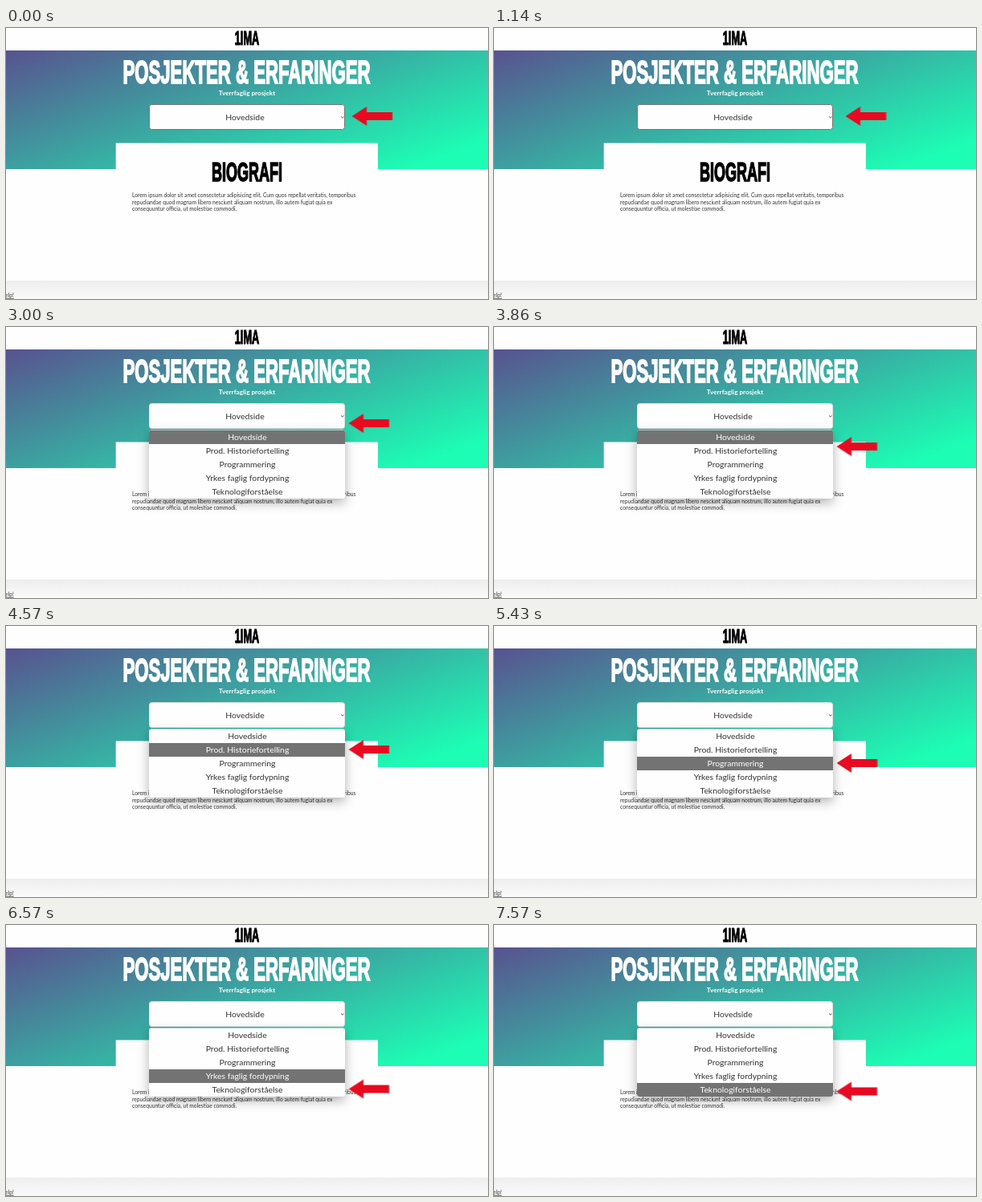
An HTML page that plays this animation: 600x338 px, repeating every 7710 ms.

```html
<!DOCTYPE html>
<html lang="no">
<head>
<meta charset="utf-8">
<title>Posjekter &amp; erfaringer</title>
<style>
  html, body { margin: 0; width: 100%; height: 100%; overflow: hidden; background: #fefefe; }
  svg { display: block; width: 600px; height: 338px; }
  text { font: 10.4px Lato, "Open Sans", sans-serif; fill: #333; }
  .mid { text-anchor: middle; }
  /* one narrow, heavy display face for all headings */
  .head {
    font: 700 40px "Liberation Sans", Arial, sans-serif;
    fill: #000; stroke: #000; stroke-width: .05em;
    transform: scaleX(.555); transform-box: fill-box; transform-origin: center;
  }
  .light { fill: #fff; stroke: #fff; }
  .copy { font-size: 6.72px; }
  .menu { animation: open 7.71s step-end infinite; }
  .ring { animation: ring 7.71s step-end infinite; }
  .pick { animation: pick 7.71s step-end infinite; }
  .arrow { animation: point 7.71s ease-in-out infinite; }
  .panel { filter: drop-shadow(0 5px 7px rgba(0, 0, 0, .3)); }
  @keyframes open { 0% { visibility: hidden } 35.2%, 100% { visibility: visible } }
  @keyframes ring { 0% { stroke: #777 } 35.2%, 100% { stroke: #e4e4e4 } }
  @keyframes pick {
    0% { transform: translateY(0) }
    51% { transform: translateY(17px) }
    63% { transform: translateY(34px) }
    74% { transform: translateY(51px) }
    86.5%, 100% { transform: translateY(68px) }
  }
  @keyframes point {
    0% { transform: translate(430.5px, 110px) }
    14.8% { transform: translate(437.5px, 110px) }
    27.8%, 36% { transform: translate(426.5px, 110px) }
    43%, 47% { transform: translate(426.5px, 138px) }
    52%, 59% { transform: translate(426.5px, 154px) }
    66%, 71% { transform: translate(426.5px, 171px) }
    75%, 79% { transform: translate(426.5px, 188px) }
    85% { transform: translate(426.5px, 204.5px) }
    92%, 100% { transform: translate(426.5px, 207.5px) }
  }
</style>
</head>
<body>
<svg viewBox="0 0 600 338">
  <defs>
    <linearGradient id="sky" gradientUnits="userSpaceOnUse" x1="241" y1="-60" x2="359" y2="264">
      <stop stop-color="#58528f"/>
      <stop offset=".9" stop-color="#1dfdb4"/>
    </linearGradient>
    <linearGradient id="foot" x2="0" y2="1">
      <stop stop-color="#eee"/>
      <stop offset="1" stop-color="#fafafa"/>
    </linearGradient>
    <clipPath id="round"><rect x="178" y="128.5" width="244" height="85.5" rx="3"/></clipPath>
  </defs>

  <rect width="600" height="338" fill="#fefefe"/>
  <text class="head mid" x="300" y="21.5" style="font-size:23px">1IMA</text>
  <rect y="28" width="600" height="148" fill="url(#sky)"/>
  <text class="head light mid" x="299.5" y="69.5">POSJEKTER &amp; ERFARINGER</text>
  <text class="mid" x="300" y="83.5" style="font-size:8.2px;font-weight:700;fill:#fff">Tverrfaglig prosjekt</text>

  <rect x="136.7" y="143.5" width="326.3" height="120" fill="#fefefe"/>
  <text class="head mid" x="300" y="191" style="font-size:32.5px">BIOGRAFI</text>
  <text class="copy" x="157" y="211">Lorem ipsum dolor sit amet consectetur adipisicing elit. Cum quos repellat veritatis, temporibus</text>
  <text class="copy" x="157" y="219.7">repudiandae quod magnam libero nesciunt aliquam nostrum, illo autem fugiat quia ex</text>
  <text class="copy" x="157" y="228.4">consequuntur officia, ut molestiae commodi.</text>

  <rect y="315" width="600" height="23" fill="url(#foot)"/>
  <text class="copy" x="-1" y="336" text-decoration="underline">elp!</text>

  <rect class="ring" x="178.5" y="95.5" width="243" height="31" rx="3" fill="#fefefe"/>
  <text class="mid" x="297.5" y="115">Hovedside</text>
  <path d="M417 110.5l1.7 1.5 1.7-1.5" fill="none" stroke="#333" stroke-width=".9"/>

  <g class="menu">
    <rect class="panel" x="178" y="128.5" width="244" height="85.5" rx="3" fill="#fefefe"/>
    <g clip-path="url(#round)"><rect class="pick" x="178" y="129" width="244" height="17" fill="#737373"/></g>
    <g id="rows"></g>
  </g>

  <path class="arrow" d="M0 0L18.5-12V-5H50.5V5H18.5V12Z" fill="#e80a20"/>
</svg>
<script>
  const labels = ["Hovedside", "Prod. Historiefortelling", "Programmering", "Yrkes faglig fordypning", "Teknologiforståelse"];
  const starts = [0, .51, .63, .74, .865, 1];
  const dark = "#333", lit = "#fff";
  const rows = document.getElementById("rows");
  labels.forEach((label, i) => {
    const row = document.createElementNS("http://www.w3.org/2000/svg", "text");
    row.setAttribute("class", "mid");
    row.setAttribute("x", 300.5);
    row.setAttribute("y", 141 + 17 * i);
    row.textContent = label;
    rows.append(row);
    const after = i < labels.length - 1 ? dark : lit;
    row.animate([
      { fill: i ? dark : lit, offset: 0, easing: "step-end" },
      { fill: lit, offset: starts[i], easing: "step-end" },
      { fill: after, offset: starts[i + 1], easing: "step-end" },
      { fill: after, offset: 1 }
    ], { duration: 7710, iterations: Infinity });
  });
</script>
</body>
</html>
```
